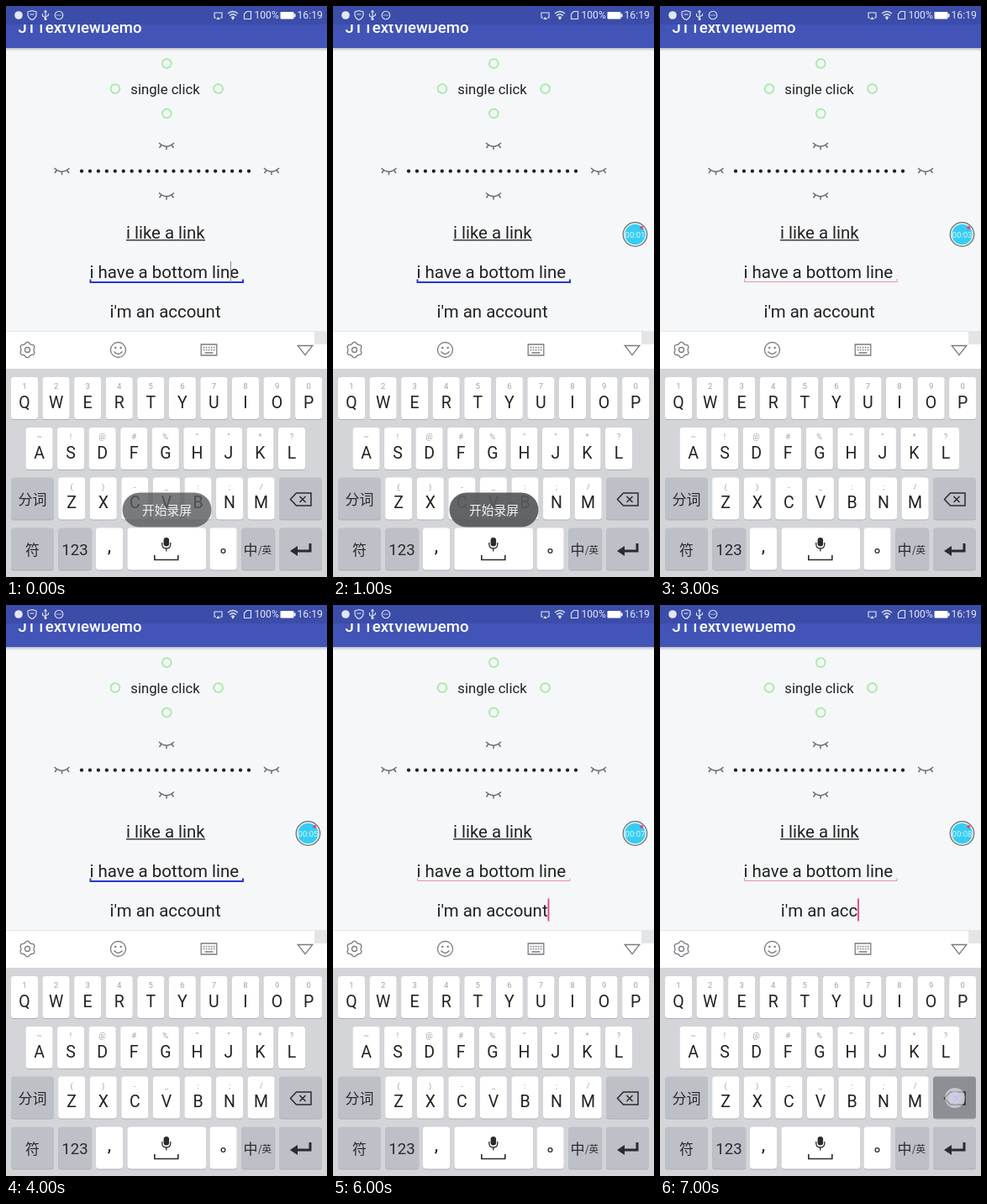
These frames come from a looping animation (382x680 px, 8 s). An HTML page with a canvas:

```html
<!DOCTYPE html>
<html lang="en">
<head>
<meta charset="utf-8">
<style>
html, body { margin: 0; width: 100%; height: 100%; overflow: hidden; background: #f6f7f9; }
canvas { display: block; width: 382px; height: 680px; }
</style>
</head>
<body>
<canvas id="stage" width="382" height="680"></canvas>
<script>
const ctx = document.getElementById('stage').getContext('2d');
const LATIN = 'Roboto, "Noto Sans CJK SC", "Noto Sans CJK", sans-serif';
const CJK = '"Noto Sans CJK SC", "Noto Sans CJK", sans-serif';
const BLUE = '#2a36c8', PINK = '#e791ad', ACCENT = '#ec407a', INK = '#212121';
const ACCOUNT = "i'm an account";

// One state per second; unset fields keep these defaults.
const base = { keyboard: true, line: BLUE, account: ACCOUNT };
const states = [
  { caret: '#888', toast: ['开始录屏', 138, 107, 0.8] },
  { clock: 1, toast: ['开始录屏', 138, 107, 0.93] },
  { clock: 2, keyboard: false },
  { clock: 3, line: PINK },
  { clock: 5 },
  { clock: 6, toast: ["your account's length is longer then 6 !", 55, 273, 0.93] },
  { clock: 7, line: PINK, editing: true },
  { clock: 8, line: PINK, editing: true, account: "i'm an acc", pressed: true }
].map(s => ({ ...base, ...s }));

function text(str, x, y, size, color = INK, align = 'center', weight = 400, family = LATIN) {
  ctx.font = `${weight} ${size}px ${family}`;
  ctx.textAlign = align;
  ctx.fillStyle = color;
  ctx.fillText(str, x, y);
}

function rect(x, y, w, h, color) {
  ctx.fillStyle = color;
  ctx.fillRect(x, y, w, h);
}

function rounded(x, y, w, h, r, color) {
  ctx.beginPath();
  ctx.roundRect(x, y, w, h, r);
  ctx.fillStyle = color;
  ctx.fill();
}

function disc(x, y, r, color) {
  ctx.beginPath();
  ctx.arc(x, y, r, 0, 7);
  ctx.fillStyle = color;
  ctx.fill();
}

function ring(x, y, r, color, width) {
  ctx.beginPath();
  ctx.arc(x, y, r, 0, 7);
  ctx.strokeStyle = color;
  ctx.lineWidth = width;
  ctx.stroke();
}

// Strokes or fills SVG path data relative to a point.
function path(x, y, d, color, width) {
  ctx.save();
  ctx.translate(x, y);
  const p = new Path2D(d);
  if (width) {
    ctx.strokeStyle = color;
    ctx.lineWidth = width;
    ctx.stroke(p);
  } else {
    ctx.fillStyle = color;
    ctx.fill(p);
  }
  ctx.restore();
}

function statusBar() {
  const c = '#e3e6f5';
  rect(0, 0, 382, 22, '#3b4ca9');
  disc(15, 11, 4.8, c);
  path(31, 11, 'M0-5.5L5-4V0Q4 4 0 5.5Q-4 4-5 0V-4ZM-2.5-1H2.5', c, 1.1);
  path(47, 11, 'M0-5V5M-3.5-2V1L0 3M3.5-2V0L0 2M-1.5-3.5L0-5.5L1.5-3.5', c, 1.1);
  disc(47, 15.5, 1.5, c);
  ring(63, 11, 4.8, c, 1.1);
  [-2.2, 0, 2.2].forEach(dx => disc(63 + dx, 11, 0.7, c));
  path(252.5, 11, 'M-2.5 3H-4.5V-3H4.5V3H2.5', c, 1.1);
  path(252.5, 11, 'M0 2L2.5 5H-2.5Z', c);
  path(270, 11, 'M-6-2Q0-7 6-2M-4 .5Q0-3 4 .5M-2 3Q0 1 2 3', c, 1.3);
  disc(270, 15, 1.2, c);
  path(287.5, 11, 'M-1-4.5H4V4.5H-4V-1.5Z', c, 1.1);
  text('100%', 295.5, 15.3, 12.1, c, 'left');
  rounded(326.5, 7, 16, 8.5, 1, '#fff');
  rect(342.5, 9.3, 2, 4, '#fff');
  text('16:19', 377, 15.3, 12.3, c, 'right');
}

function appBar(bottom) {
  const shade = ctx.createLinearGradient(0, bottom, 0, bottom + 4);
  shade.addColorStop(0, 'rgba(0,0,0,.22)');
  shade.addColorStop(1, 'rgba(0,0,0,0)');
  rect(0, bottom, 382, 4, shade);
  rect(0, bottom - 52, 382, 52, '#4254b7');
  text('JTTextViewDemo', 14.5, bottom - 18, 18.57, '#fff', 'left', 500);
}

function closedEye(x, y) {
  path(x, y, 'M-9-3.5Q0 5 9-3.5M-6-1L-8.5 2.5M0 .8V4.8M6-1L8.5 2.5', '#6c6c6c', 1.5);
}

function content(s) {
  ctx.save();
  ctx.translate(0, s.keyboard ? 0 : 24);
  for (const [x, y] of [[191.3, 68.5], [130, 98.5], [252.6, 98.5], [191.3, 128]]) ring(x, y, 5.4, '#a0eaa0', 1.7);
  text('single click', 189.5, 105, 16.71);

  for (const [x, y] of [[191, 166.5], [66.5, 196.5], [316, 196.5], [191, 226]]) closedEye(x, y);
  for (let i = 0; i < 21; i++) disc(90 + i * 9.95, 196.7, 2.15, INK);

  text('i like a link', 189.8, 277, 20.43);
  rect(143, 278.2, 94, 1.3, INK);

  text('i have a bottom line', 99.5, 324, 20.5, INK, 'left');
  const [y, width] = s.line === BLUE ? [329, 2] : [328.5, 1];
  path(0, y, 'M100.5-3.5V0H282V-3.5', s.line, width);
  if (s.caret) rect(267, 304, 1, 25, s.caret);

  text(s.account, 189.5, 371, 20.43);
  if (s.editing) rect(189.5 + ctx.measureText(s.account).width / 2, 349.5, 1.8, 27, ACCENT);
  ctx.restore();
}

function key(x, y, w, color = '#fff') {
  rounded(x, y + 1, w, 50, 3.5, '#aeb0b4');
  rounded(x, y, w, 50, 3.5, color);
}

function letterRow(letters, hints, x0, y) {
  [...letters].forEach((letter, i) => {
    const x = x0 + i * 37.57;
    key(x, y, 32);
    text(hints[i], x + 16, y + 14, 9.5, '#a2a2a2');
    text(letter, x + 16, y + 36.6, 19.5, '#222');
  });
}

function toolIcons() {
  const c = '#777b80';
  const gear = [];
  for (let i = 0; i < 24; i++) {
    const a = (i + 1.5) / 24 * Math.PI * 2, r = i % 4 < 2 ? 9.2 : 7.7;
    gear.push(`${r * Math.cos(a)} ${r * Math.sin(a)}`);
  }
  path(25.5, 409.5, 'M' + gear.join('L') + 'Z', c, 1.3);
  ring(25.5, 409.5, 3, c, 1.3);
  ring(133.5, 409.5, 9, c, 1.3);
  disc(130.3, 407, 1.2, c);
  disc(136.7, 407, 1.2, c);
  path(133.5, 409.5, 'M-5 2Q0 8 5 2', c, 1.3);
  path(241.5, 409.5, 'M-9.3-6.5H9.3V6.5H-9.3ZM-5 3.5H5', c, 1.3);
  for (let i = 0; i < 10; i++) rect(234.8 + i % 5 * 3, 405.8 + Math.floor(i / 5) * 3, 1.6, 1.6, c);
  path(356, 410, 'M-8.8-5.5H8.8L0 5.7Z', c, 1.3);
}

function keyboard(s) {
  const grey = '#bdc0c6', dark = '#292b2e';
  rect(0, 387, 382, 45, '#fff');
  rect(0, 387, 382, 1, '#e3e5e7');
  rect(367, 388, 15, 15, '#e4e5e7');
  toolIcons();
  rect(0, 432, 382, 248, '#d3d5d8');
  letterRow('QWERTYUIOP', '1234567890', 6, 442);
  letterRow('ASDFGHJKL', '~!@#%“”*?', 23.5, 502);
  letterRow('ZXCVBNM', '()-_:;/', 62.2, 561.5);

  key(6, 561.5, 51, grey);
  text('分词', 31.5, 593.5, 17, dark, 'center', 400, CJK);
  key(325, 561.5, 51, s.pressed ? '#8d8f94' : grey);
  path(351, 587.5, 'M-12.5 0L-5.5-7.5H12V7.5H-5.5ZM-1.5-3.5L5.5 3.5M5.5-3.5L-1.5 3.5', dark, 1.5);
  if (s.pressed) {
    disc(351, 587, 12, 'rgba(255,255,255,.5)');
    disc(351, 587, 7.5, 'rgba(205,205,238,.8)');
  }

  key(6, 621.5, 51, grey);
  text('符', 31.5, 653.5, 17, dark, 'center', 400, CJK);
  key(62.2, 621.5, 40, grey);
  text('123', 82, 654, 18.6, dark);
  key(107, 621.5, 32);
  text(',', 123, 650, 20, dark, 'center', 500);
  key(144.5, 621.5, 93.5);
  rounded(187.6, 633, 6.5, 10.5, 3.25, dark);
  path(190.8, 640, 'M-5-1V1Q-5 6 0 6Q5 6 5 1V-1M0 6V9.5', dark, 1.3);
  path(190.8, 660, 'M-14-6V-.5H14V-6', dark, 1.6);
  key(242.6, 621.5, 32);
  ring(258.5, 649, 2.4, dark, 1.3);
  key(280.2, 621.5, 40, grey);
  text('中', 291, 653.5, 17, dark, 'center', 400, CJK);
  text('/英', 308, 652, 11.5, dark, 'center', 400, CJK);
  key(325, 621.5, 51, grey);
  path(351, 648, 'M11-8V1H-6', dark, 3);
  path(351, 649, 'M-13 0L-4-6V6Z', dark);
}

function toast([message, x, w, alpha]) {
  ctx.save();
  ctx.globalAlpha = alpha;
  rounded(x + 0.5, 579.5, w - 1, 41, 20.5, '#58595b');
  ctx.restore();
  const cjk = message.length < 5;
  text(message, x + w / 2, cjk ? 605.5 : 605, cjk ? 14.8 : 13.2, '#f2f2f2');
}

function recorder(seconds) {
  disc(359.5, 272, 14.7, '#fff');
  ring(359.5, 272, 14.2, '#77797c', 1.5);
  disc(359.5, 272, 12.2, '#37cdf3');
  text('00:0' + seconds, 359.5, 275.5, 9.6, '#d9f5fd');
  disc(367.3, 264, 2, '#e8447c');
}

function draw(now) {
  const s = states[Math.floor(now % 8000 / 1000)];
  rect(0, 0, 382, 680, '#f6f7f9');
  content(s);
  appBar(s.keyboard ? 50 : 74);
  statusBar();
  if (s.keyboard) keyboard(s);
  if (s.toast) toast(s.toast);
  if (s.clock) recorder(s.clock);
}

const start = performance.now();
function tick() {
  draw(performance.now() - start);
  requestAnimationFrame(tick);
}
tick();
</script>
</body>
</html>
```
